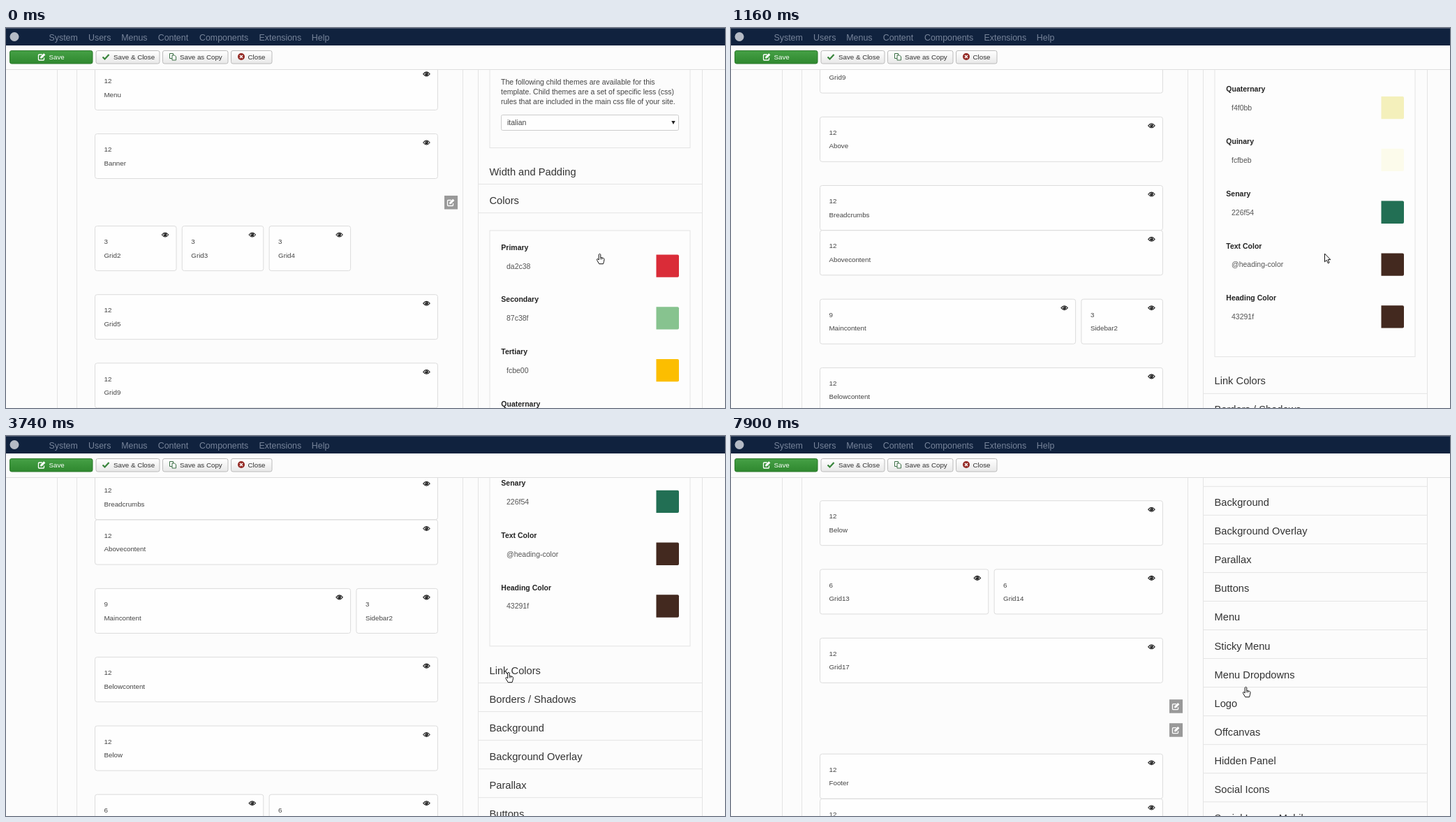
Recreate the animation shown at these times as an HTML page. Size 1030 by 544 pixels, loop 8000 ms.

```html
<!DOCTYPE html>
<html lang="en">
<head>
<meta charset="utf-8">
<title>Template settings</title>
<style>
html, body { margin: 0; width: 100%; height: 100%; overflow: hidden; background: #fcfcfc; }
svg { display: block; font-family: "Liberation Sans", Arial, sans-serif; }
text { white-space: pre; }
</style>
</head>
<body>
<svg id="stage" width="1030" height="544" viewBox="0 0 1030 544"></svg>
<script>
const LINE = '#e4e4e4';
const text = (x, y, s, size, fill, extra = '') =>
  `<text x="${x}" y="${y}" font-size="${size}" fill="${fill}" ${extra}>${s}</text>`;
const rect = (x, y, w, h, fill, extra = '') =>
  `<rect x="${x}" y="${y}" width="${w}" height="${h}" fill="${fill}" ${extra}/>`;
const path = (d, extra) => `<path d="${d}" ${extra}/>`;
const at = (x, y, s) => `<g transform="translate(${x} ${y})">${s}</g>`;
const vline = x => rect(x, 60, 1, 484, LINE);

const eye = path('M-4.7 0Q0-6 4.7 0Q0 6-4.7 0Z', 'fill="#fff" stroke="#222" stroke-width="1.1"') +
  '<circle r="2.4" fill="#222"/><circle cx="-.8" cy="-.8" r=".7" fill="#ccc"/>';
const pencil = path('M3.5 1V3.2Q3.5 4.5 2.2 4.5H-3.2Q-4.5 4.5-4.5 3.2V-2.2Q-4.5-3.5-3.2-3.5H.8',
  'fill="none" stroke="#fff" stroke-width="1.3"') +
  path('M-1.8 2V-.2L3.2-5.2 5.4-3 .4 2Z', 'fill="#fff"');

// Layout blocks: top, then [span, label] cells on a 12-column grid.
const rows = [
  [53.4, [12, 'Menu']],
  [151.5, [12, 'Banner']],
  [283.5, [3, 'Grid2'], [3, 'Grid3'], [3, 'Grid4']],
  [381.7, [12, 'Grid5']],
  [479.8, [12, 'Grid9']],
  [578, [12, 'Above']],
  [676.2, [12, 'Breadcrumbs']],
  [740.5, [12, 'Abovecontent']],
  [838.9, [9, 'Maincontent'], [3, 'Sidebar2']],
  [937.1, [12, 'Belowcontent']],
  [1035.5, [12, 'Below']],
  [1133.7, [6, 'Grid13'], [6, 'Grid14']],
  [1232.1, [12, 'Grid17']],
  [1398, [12, 'Footer']],
  [1462.3, [12, '']]
];

function blocks() {
  let out = '';
  for (const [y, ...cells] of rows) {
    let col = 0;
    for (const [span, label] of cells) {
      const x = 127.5 + col * 41.6, w = span * 41.6 - 8.3;
      out += rect(x, y, w, 64, '#fefefe', 'rx="3" stroke="#dcdcdc"') +
        text(x + 13, y + 25.7, span, 9.75, '#444') +
        text(x + 13, y + 45.1, label, 9.75, '#444') +
        at(x + w - 16, y + 12.5, eye);
      col += span;
    }
  }
  for (const y of [240, 1320, 1354])
    out += rect(628, y, 19, 19.5, '#999') + at(637, y + 10, pencil);
  return out;
}

const colors = [
  ['Primary', 'da2c38'], ['Secondary', '87c38f'], ['Tertiary', 'fcbe00'],
  ['Quaternary', 'f4f0bb'], ['Quinary', 'fcfbeb'], ['Senary', '226f54'],
  ['Text Color', '@heading-color'], ['Heading Color', '43291f']
];
const sections = ['Link Colors', 'Borders / Shadows', 'Background', 'Background Overlay', 'Parallax',
  'Buttons', 'Menu', 'Sticky Menu', 'Menu Dropdowns', 'Logo', 'Offcanvas', 'Hidden Panel',
  'Social Icons', 'Social Icons - Mobile'];

const heading = (y, s) => text(692.5, y - 13, s, 14.7, '#333') + rect(677, y - .5, 320, 1, LINE);

function panel() {
  const info = ['The following child themes are available for this',
    'template. Child themes are a set of specific less (css)',
    'rules that are included in the main css file of your site.'];
  let out = rect(693, -40, 287, 211.5, 'none', `stroke="${LINE}"`);
  info.forEach((s, i) => out += text(709, 80.5 + i * 14.2, s, 10.5, '#444'));
  out += rect(709.5, 124.5, 254, 22, '#fefefe', 'rx="2" stroke="#ccc"') +
    text(718, 139, 'italian', 10.5, '#444') + path('M953.3 133H958.7L956 138Z', 'fill="#222"');
  out += heading(223.5, 'Width and Padding') + heading(264.7, 'Colors') +
    rect(693, 290, 287, 631.3, '#fdfdfd', `stroke="${LINE}"`);
  colors.forEach(([name, value], i) => {
    const y = 314 + i * 74.78;
    const fill = value[0] === '@' ? '43291f' : value;
    out += text(709.3, y + 3.7, name, 10.5, '#222', 'font-weight="bold"') +
      text(717, y + 30.5, value, 10.5, '#555') +
      at(931.5, y + 10.4, path('M0 0H30.5Q32.5 0 32.5 2V30.3Q32.5 32.3 30.5 32.3H0Z', `fill="#${fill}"`));
  });
  sections.forEach((s, i) => out += heading(974 + i * 41.05, s));
  return out;
}

function header() {
  const nav = [['System', 61.5], ['Users', 118], ['Menus', 165.3], ['Content', 217.7],
    ['Components', 277], ['Extensions', 362.6], ['Help', 437.8]];
  const button = (x, w, fill = 'url(#light)', edge = '#bbb') =>
    rect(x, 32.5, w, 18.5, fill, `rx="2.5" stroke="${edge}"`);
  const label = (x, s, fill = '#333') => text(x, 45, s, 9.75, fill);
  const page = d => path(d, 'fill="#fff" stroke="#3b6e45"');
  return rect(0, 25, 1030, 35, '#fcfcfc') + rect(0, 59, 1030, 1, '#dedede') +
    rect(0, 0, 1030, 25, '#10223e') + rect(0, 0, 1030, 1, '#46536a') +
    '<circle cx="12" cy="12.5" r="6.5" fill="#b5bbc5"/>' +
    nav.map(([s, x]) => text(x, 17.6, s, 12.4, '#77849a')).join('') +
    button(5.5, 118.5, 'url(#green)', '#2c7a2c') + at(51, 41.5, pencil) + label(61.5, 'Save', '#fff') +
    button(129, 91) + path('M138.5 41.5L141.5 44.5 147.5 38', 'fill="none" stroke="#37843b" stroke-width="2.2"') +
    label(154, 'Save &amp; Close') +
    button(224.5, 93.5) + page('M234.5 36.5H239.5V43.5H234.5Z') + page('M238 39H241.5L243.5 41V46H238Z') +
    label(249, 'Save as Copy') +
    button(322.5, 58.5) + '<circle cx="337" cy="41" r="5" fill="#942a25"/>' +
    path('M335 39L339 43M339 39L335 43', 'stroke="#fff" stroke-width="1.5"') + label(346.5, 'Close');
}

const stop = (o, c) => `<stop offset="${o}" stop-color="${c}"/>`;
const gradient = (id, a, b) =>
  `<linearGradient id="${id}" x2="0" y2="1">${stop(0, a)}${stop(1, b)}</linearGradient>`;
const ink = 'fill="#fff" stroke="#111" stroke-width="1" stroke-linejoin="round"';
const hand = path('M-1.3 9V1.2Q0-.6 1.3 1.2V5.5L5 6.3Q6.6 6.8 6.5 8.5L6 11.5 5 14.7H-.8L-3.8 9.5Q-4-.5-3.8 8Q-2.8 7.2-1.3 9Z'
  .replace('Q-4-.5-3.8 8', 'Q-4.6 8.3-3.6 7.6'), ink) +
  path('M1.3 5.5V8.5M3.3 6V8.5', 'stroke="#111" stroke-width=".8"');
const arrow = path('M0 0V11.8L2.8 9.3 4.8 13.8 6.6 13 4.7 8.6H8.3Z', ink);

const stage = document.getElementById('stage');
stage.innerHTML = gradient('green', '#45a045', '#2f882f') + gradient('light', '#fff', '#e8e8e8') +
  rect(0, 0, 1030, 544, '#fcfcfc') + [73, 101, 654, 676, 997].map(vline).join('') +
  `<g id="page">${blocks()}${panel()}</g>` + header() +
  `<g id="cursor"><g id="hand">${hand}</g><g id="arrow">${arrow}</g></g>`;
const [pageEl, cursorEl, handEl, arrowEl] =
  ['page', 'cursor', 'hand', 'arrow'].map(id => document.getElementById(id));

// Held steps: [time, scroll] and [time, x, y].
const scrollSteps = [
  [0, 0], [150, 72], [290, 144], [420, 216], [550, 265], [700, 315], [850, 362], [1000, 408], [1160, 450.7],
  [1300, 456], [1420, 458], [1540, 459], [1970, 540], [2110, 597], [2250, 620.5],
  [5300, 744.3], [5420, 768], [5560, 778], [5700, 782],
  [7210, 838], [7340, 884], [7480, 914], [7620, 932], [7760, 940], [7900, 942.8]
];
const cursorSteps = [
  [0, 850.5, 323], [2400, 805, 327], [2540, 763.5, 332], [2690, 758, 330], [2840, 764, 326],
  [3030, 778, 320], [3170, 784, 308], [3320, 765, 312], [3460, 740, 325], [3610, 720, 338],
  [3750, 707, 345], [3900, 725, 348], [4040, 745, 350],
  [4160, 748, 355], [4300, 718, 364], [4440, 688, 372], [4580, 716.5, 380],
  [5840, 712, 382], [6260, 702, 383], [6410, 743, 391], [6940, 737, 391],
  [7620, 738, 375], [7760, 737.5, 359]
];
const held = (steps, t) => steps.findLast(s => s[0] <= t);

function draw(now) {
  const t = Math.max(0, now) % 8000;
  const [, scroll] = held(scrollSteps, t);
  const [, x, y] = held(cursorSteps, t);
  const isArrow = t >= 1160 && t < 2250;
  pageEl.setAttribute('transform', `translate(0 ${-scroll})`);
  cursorEl.setAttribute('transform', `translate(${x} ${y})`);
  handEl.style.display = isArrow ? 'none' : '';
  arrowEl.style.display = isArrow ? '' : 'none';
}

const start = performance.now();
function tick(now) {
  draw(now - start);
  requestAnimationFrame(tick);
}
draw(0);
requestAnimationFrame(tick);
</script>
</body>
</html>
```
